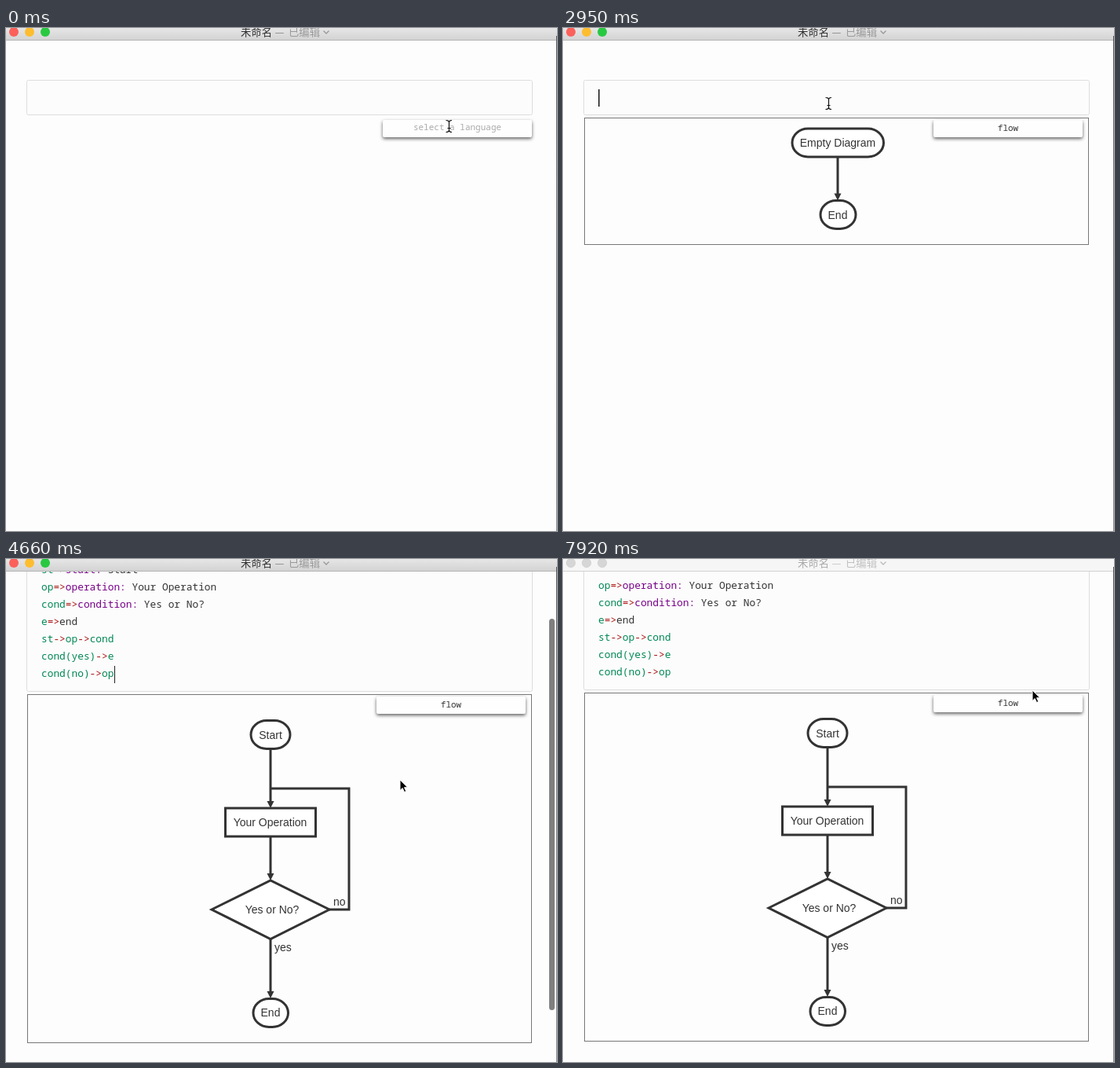
An HTML page that plays this animation: 702x640 px, repeating every 8 s.

```html
<!DOCTYPE html>
<html lang="en">
<head>
<meta charset="utf-8">
<title>Flow diagram editor</title>
<style>
html, body { margin: 0; width: 100%; height: 100%; overflow: hidden; background: #fdfdfd; }
svg { display: block; width: 702px; height: 640px; }
text { fill: #333; }
.title { font: 13.33px "Noto Sans CJK SC", "Noto Sans CJK", sans-serif; }
.code { font: 12.83px "Noto Sans Mono", monospace; }
.code .id { fill: #085; }
.code .op { fill: #a11; }
.code .key { fill: #708; }
.lang { font: 11px "Noto Sans Mono", monospace; text-anchor: middle; }
.item { font: 16px "Open Sans", sans-serif; }
.label { font: 14px "Liberation Sans", Arial, sans-serif; text-anchor: middle; }
.label.side { text-anchor: start; }
.shape { fill: #fff; stroke: #333; stroke-width: 3; }
.wire { fill: none; stroke: #333; stroke-width: 3; }
.head { fill: #333; }
.frame { fill: none; stroke: #777; }
.fence { fill: #fcfcfc; stroke: #ddd; }
.plate { fill: #fefefe; filter: drop-shadow(0 2px 2.2px rgba(0,0,0,.62)); }
.caret { fill: #222; }

/* Every change is a hard step; 1% = 80 ms */
.a { animation: 8s step-end infinite; }

.active { animation-name: active; }
@keyframes active { 0% { opacity: 1 } 66.25% { opacity: 0 } }
.inactive { animation-name: inactive; }
@keyframes inactive { 0% { opacity: 0 } 66.25% { opacity: 1 } }

.scroll { animation-name: scroll; }
@keyframes scroll {
  0% { transform: none }
  50.25% { transform: translateY(-4px) }
  51.375% { transform: translateY(-18px) }
  52.625% { transform: translateY(-34px) }
  53.75% { transform: translateY(-48px) }
  54.875% { transform: translateY(-58px) }
  56% { transform: translateY(-65px) }
  57.125% { transform: translateY(-70px) }
  58.25% { transform: translateY(-74px) }
  59.75% { transform: translateY(-76px) }
}
.thumb { animation-name: thumb; }
@keyframes thumb {
  0% { opacity: 0; transform: none }
  50.25% { opacity: 1; transform: translateY(3px) }
  51.375% { opacity: 1; transform: translateY(14px) }
  52.625% { opacity: 1; transform: translateY(27px) }
  53.75% { opacity: 1; transform: translateY(38px) }
  54.875% { opacity: 1; transform: translateY(46px) }
  56% { opacity: 1; transform: translateY(52px) }
  57.125% { opacity: 1; transform: translateY(56px) }
  58.25% { opacity: 1; transform: translateY(59px) }
  59.75% { opacity: 1; transform: translateY(61px) }
  66.25% { opacity: 0; transform: translateY(61px) }
}

.before { animation-name: before; }
@keyframes before { 0% { opacity: 1 } 41.375% { opacity: 0 } }
.after { animation-name: after; }
@keyframes after { 0% { opacity: 0 } 41.375% { opacity: 1 } }
.caret-top { animation-name: caret-top; }
@keyframes caret-top {
  0% { opacity: 0 } 3.375% { opacity: 1 } 6% { opacity: 0 }
  32.625% { opacity: 1 } 41.375% { opacity: 0 }
}
.caret-end { animation-name: caret-end; }
@keyframes caret-end {
  0% { opacity: 0 } 41.375% { opacity: 1 } 47% { opacity: 0 }
  52.625% { opacity: 1 } 60.75% { opacity: 0 }
}

.pushed { animation-name: pushed; }
@keyframes pushed { 0% { transform: none } 41.375% { transform: translateY(132px) } }
.strip { animation-name: strip; }
@keyframes strip { 0% { opacity: 0 } 21.5% { opacity: 1 } 30.375% { opacity: 0 } }
.empty { animation-name: empty; }
@keyframes empty { 0% { opacity: 0 } 30.375% { opacity: 1 } 45.875% { opacity: 0 } }
.chart { animation-name: chart; }
@keyframes chart { 0% { opacity: 0 } 45.875% { opacity: 1 } }

.inset { animation-name: inset; }
@keyframes inset { 0% { transform: none } 21.5% { transform: translateX(-8px) } }
.hint { animation-name: hint; }
@keyframes hint { 0% { opacity: 1 } 11.625% { opacity: 0 } }
.focus { animation-name: focus; }
@keyframes focus { 0% { opacity: 0 } 6% { opacity: 1 } 20.375% { opacity: 0 } }
.typed0 { animation-name: typed0; }
@keyframes typed0 { 0% { opacity: 0 } 6% { opacity: 1 } 11.625% { opacity: 0 } }
.typed1 { animation-name: typed1; }
@keyframes typed1 { 0% { opacity: 0 } 11.625% { opacity: 1 } 13.75% { opacity: 0 } }
.typed2 { animation-name: typed2; }
@keyframes typed2 { 0% { opacity: 0 } 13.75% { opacity: 1 } 20.375% { opacity: 0 } }
.chosen { animation-name: chosen; }
@keyframes chosen { 0% { opacity: 0 } 20.375% { opacity: 1 } }
.menu { animation-name: menu; }
@keyframes menu { 0% { opacity: 0 } 14.75% { opacity: 1 } 20.375% { opacity: 0 } }

.beam { animation-name: beam; }
@keyframes beam {
  0% { transform: translate(564px, 125px) }
  17% { transform: translate(-99px, 0) }
  30.375% { transform: translate(338px, 96px) }
  44.75% { transform: translate(-99px, 0) }
}
.arrow { animation-name: arrow; }
@keyframes arrow {
  0% { transform: translate(-99px, 0) }
  17% { transform: translate(598px, 144px) }
  21.5% { transform: translate(560px, 146px) }
  23.75% { transform: translate(500px, 142px) }
  25.875% { transform: translate(430px, 134px) }
  27% { transform: translate(385px, 124px) }
  30.375% { transform: translate(-99px, 0) }
  50.25% { transform: translate(501px, 280px) }
  63% { transform: translate(430px, 291px) }
  64.125% { transform: translate(338px, 302px) }
  66.25% { transform: translate(-99px, 0) }
  93.5% { transform: translate(331px, 302px) }
  95.75% { transform: translate(370px, 282px) }
  96.875% { transform: translate(445px, 240px) }
  98% { transform: translate(535px, 194px) }
  99% { transform: translate(597px, 166px) }
}
</style>
</head>
<body>
<svg viewBox="0 0 702 640">
  <defs>
    <linearGradient id="bar" x2="0" y2="1">
      <stop stop-color="#e6e6e6"/><stop offset="1" stop-color="#d3d3d3"/>
    </linearGradient>
    <linearGradient id="edge" x2="0" y2="1">
      <stop stop-color="#555"/><stop offset=".3" stop-color="#777"/><stop offset="1" stop-color="#8c8c8c"/>
    </linearGradient>
    <path id="head" class="head" d="M0 0L-4.5 -9H4.5Z"/>
    <clipPath id="view"><path d="M0 16H702V640H0Z"/></clipPath>
  </defs>

  <rect width="702" height="640" fill="#fdfdfd"/>

  <g clip-path="url(#view)">
    <g class="a scroll">
      <rect class="a before fence" x="26.5" y="66.5" width="644" height="44" rx="2"/>
      <g class="a after">
        <rect class="fence" x="26.5" y="66.5" width="644" height="176" rx="2"/>
        <g class="code">
          <text x="45" y="92"><tspan class="id">st</tspan><tspan class="op">=&gt;</tspan><tspan class="key">start:</tspan> Start</text>
          <text x="45" y="114"><tspan class="id">op</tspan><tspan class="op">=&gt;</tspan><tspan class="key">operation:</tspan> Your Operation</text>
          <text x="45" y="136"><tspan class="id">cond</tspan><tspan class="op">=&gt;</tspan><tspan class="key">condition:</tspan> Yes or No?</text>
          <text x="45" y="158"><tspan class="id">e</tspan><tspan class="op">=&gt;</tspan>end</text>
          <text x="45" y="180"><tspan class="id">st</tspan><tspan class="op">-&gt;</tspan><tspan class="id">op</tspan><tspan class="op">-&gt;</tspan><tspan class="id">cond</tspan></text>
          <text x="45" y="202"><tspan class="id">cond(yes)</tspan><tspan class="op">-&gt;</tspan><tspan class="id">e</tspan></text>
          <text x="45" y="224"><tspan class="id">cond(no)</tspan><tspan class="op">-&gt;</tspan><tspan class="id">op</tspan></text>
        </g>
      </g>
      <rect class="a caret-top caret" x="45" y="78" width="1.6" height="22"/>
      <rect class="a caret-end caret" x="138" y="210" width="1" height="22"/>

      <g class="a pushed">
        <rect class="a strip frame" x="27.5" y="114.5" width="642" height="28"/>
        <g class="a empty">
          <rect class="frame" x="27.5" y="114.5" width="642" height="161"/>
          <path class="wire" d="M350 164V212"/>
          <use href="#head" x="350" y="219.5"/>
          <rect class="shape" x="292" y="128" width="116.5" height="36" rx="20"/>
          <rect class="shape" x="328" y="219.5" width="45" height="36" rx="20"/>
          <text class="label" x="350" y="151">Empty Diagram</text>
          <text class="label" x="350" y="242.500">End</text>
        </g>
      </g>

      <g class="a chart">
        <rect class="frame" x="27.5" y="246.5" width="642" height="443"/>
        <path class="wire" d="M337 316V384M337 427V476M337 557V626M412 520H437V366H337"/>
        <use href="#head" x="337" y="391"/>
        <use href="#head" x="337" y="483"/>
        <use href="#head" x="337" y="633"/>
        <rect class="shape" x="312" y="279.5" width="50" height="36" rx="20"/>
        <rect class="shape" x="279.5" y="391" width="115" height="36"/>
        <path class="shape" d="M262 520L337 483L412 520L337 557.5Z"/>
        <rect class="shape" x="315" y="633.5" width="44.500" height="36" rx="20"/>
        <text class="label" x="337" y="303">Start</text>
        <text class="label" x="336.500" y="414">Your Operation</text>
        <text class="label" x="339" y="525">Yes or No?</text>
        <text class="label" x="337" y="656">End</text>
        <text class="label side" x="417" y="515">no</text>
        <text class="label side" x="342" y="573">yes</text>
      </g>

      <g class="a pushed">
        <g class="a inset">
          <rect class="plate" x="480" y="117" width="190" height="22" rx="2"/>
          <g class="a focus">
            <rect x="499" y="118" width="152.500" height="19.500" rx="4" fill="#fdfdfd" stroke="#b4d8f8" stroke-width="3"/>
          </g>
          <text class="a hint lang" x="575" y="130" style="fill:#aaa">select a language</text>
          <rect class="a typed0 caret" x="518" y="120" width="1" height="14"/>
          <g class="a typed1">
            <text class="lang" x="575" y="131">f</text>
            <rect class="caret" x="579" y="120" width="1" height="14"/>
          </g>
          <g class="a typed2">
            <text class="lang" x="575" y="131">fl</text>
            <rect class="caret" x="582" y="120" width="1" height="14"/>
          </g>
          <text class="a chosen lang" x="575" y="131">flow</text>
        </g>
      </g>

      <g class="a menu">
        <rect x="500.500" y="142.500" width="147" height="29" rx="2" fill="#fefefe" stroke="#ddd" style="filter:drop-shadow(0 1px 1px rgba(0,0,0,.12))"/>
        <text class="item" x="511" y="162">flow</text>
      </g>
    </g>
    <rect class="a thumb" x="692" y="17" width="7" height="498" rx="3.5" fill="#7f7f7f"/>
  </g>

  <g class="a active">
    <rect width="702" height="15" fill="url(#bar)"/>
    <rect y="15" width="702" height="1" fill="#b5b5b5"/>
    <circle cx="10" cy="5" r="6" fill="#fc605b"/>
    <circle cx="30" cy="5" r="6" fill="#fdbd2f"/>
    <circle cx="50" cy="5" r="6" fill="#28c941"/>
    <g class="title">
      <text x="299" y="10">未命名</text>
      <text x="342.500" y="10" style="fill:#888">—</text>
      <text x="360" y="10" style="fill:#999">已编辑</text>
    </g>
    <path d="M404.500 3.500L408 7L411.500 3.500" fill="none" stroke="#999" stroke-width="1.3"/>
  </g>
  <g class="a inactive">
    <rect width="702" height="15" fill="#f6f6f6"/>
    <rect y="15" width="702" height="1" fill="#d2d2d2"/>
    <g fill="#d6d6d6" stroke="#cacaca" stroke-width=".6">
      <circle cx="10" cy="5" r="5.700"/>
      <circle cx="30" cy="5" r="5.700"/>
      <circle cx="50" cy="5" r="5.700"/>
    </g>
    <g class="title">
      <text x="299" y="10" style="fill:#aaa">未命名</text>
      <text x="342.500" y="10" style="fill:#c4c4c4">—</text>
      <text x="360" y="10" style="fill:#c0c0c0">已编辑</text>
    </g>
    <path d="M404.500 3.500L408 7L411.500 3.500" fill="none" stroke="#bbb" stroke-width="1.3"/>
  </g>
  <rect x="701" y="10" width="1" height="630" fill="url(#edge)"/>

  <path class="a beam" d="M-3.500 -7.500Q0 -7.500 0.500 -5.500Q1 -7.500 4 -7.500M0.500 -6V6M-3.500 7.500Q0 7.500 0.500 5.500Q1 7.500 4 7.500M-1.500 2.500H2.500" fill="none" stroke="#111" stroke-width="1.2"/>
  <path class="a arrow" d="M1 1V14.500L4.200 11.500L6.500 16.500L8.800 15.500L6.500 10.700H10.800Z" fill="#000" stroke="#fff" stroke-width="1"/>
</svg>
</body>
</html>
```
